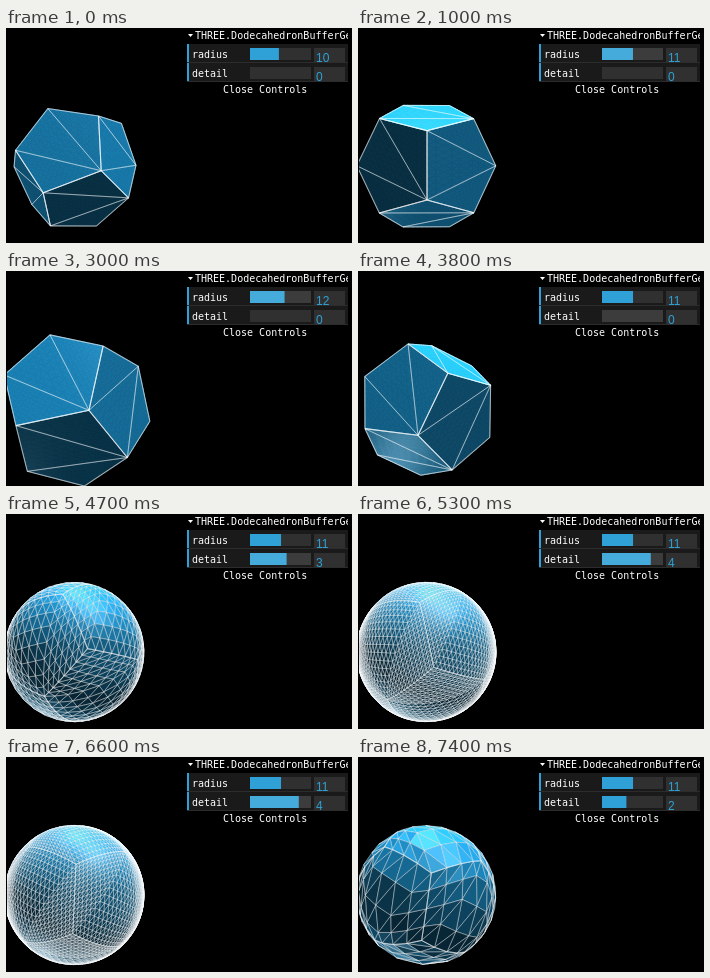
Write an HTML page with a canvas that moves like this. It is 346x215 px and loops after 7.5 s.

```html
<!DOCTYPE html>
<html lang="en">
<head>
<meta charset="utf-8">
<title>Dodecahedron geometry</title>
<style>
html, body { margin: 0; width: 100%; height: 100%; overflow: hidden; background: #000; }
canvas { display: block; }
</style>
</head>
<body>
<canvas width="346" height="215"></canvas>
<script>
const ctx = document.querySelector('canvas').getContext('2d');
const LOOP = 7500, STEP = 100;
const FOCAL = 183, CX = 68.3, CY = 138, CAMERA = [0, 0, 30];
const LIGHTS = [[0, 200, 0], [100, 200, 100], [-100, -200, -100]];
const COLOR = [21, 98, 137], EMISSIVE = [7, 37, 52], SPECULAR = 0x11 / 255;

// [time, value] keys
const RADIUS = [[300, 10], [800, 10.65], [1300, 10.65], [1700, 11.8], [2200, 12.5],
  [2600, 12.5], [3200, 11.4], [3500, 10.67]];
const ANGLE = [[0, 161.2], [3800, 230.9], [4700, 248.5], [5900, 268], [7400, 278]];
const DETAIL = [[0, 0], [4200, 1], [4400, 2], [4600, 3], [5000, 4], [5400, 5],
  [6400, 4], [6800, 3], [7100, 2]];

const T = (1 + Math.sqrt(5)) / 2, R = 1 / T;
const VERTICES = [
  [-1, -1, -1], [-1, -1, 1], [-1, 1, -1], [-1, 1, 1], [1, -1, -1], [1, -1, 1], [1, 1, -1], [1, 1, 1],
  [0, -R, -T], [0, -R, T], [0, R, -T], [0, R, T], [-R, -T, 0], [-R, T, 0], [R, -T, 0], [R, T, 0],
  [-T, 0, -R], [T, 0, -R], [-T, 0, R], [T, 0, R]];
const FACES = ['3 11 7 15 13', '7 19 17 6 15', '17 4 8 10 6', '8 0 16 2 10', '0 12 1 18 16',
  '6 10 2 13 15', '2 16 18 3 13', '18 1 9 11 3', '4 14 12 0 8', '11 9 5 19 7',
  '19 5 14 4 17', '1 12 14 5 9'].map(s => s.split(' ').map(Number));

const sub = (a, b) => [a[0] - b[0], a[1] - b[1], a[2] - b[2]];
const add = (a, b) => [a[0] + b[0], a[1] + b[1], a[2] + b[2]];
const dot = (a, b) => a[0] * b[0] + a[1] * b[1] + a[2] * b[2];
const scale = (a, k) => [a[0] * k, a[1] * k, a[2] * k];
const unit = a => scale(a, 1 / Math.hypot(a[0], a[1], a[2]));
const mix = (a, b, k) => add(a, scale(sub(b, a), k));
const cross = (a, b) => [a[1] * b[2] - a[2] * b[1], a[2] * b[0] - a[0] * b[2], a[0] * b[1] - a[1] * b[0]];
const facing = (normal, p) => dot(normal, sub(CAMERA, p)) > 0;

function tween(keys, t) {
  const i = keys.findIndex(k => k[0] > t);
  if (i === 0) return keys[0][1];
  if (i < 0) return keys[keys.length - 1][1];
  const [t0, a] = keys[i - 1], [t1, b] = keys[i];
  return a + (b - a) * (t - t0) / (t1 - t0);
}
const held = (keys, t) => keys.filter(k => k[0] <= t).pop()[1];

function rotate([x, y, z], angle) {
  const s = Math.sin(angle), c = Math.cos(angle), depth = z * c - x * s;
  return [x * c + z * s, y * c - depth * s, y * s + depth * c];
}

// Flat Phong shading
function shade(p, n) {
  const view = unit(sub(CAMERA, p));
  let diffuse = 0, gloss = 0;
  for (const light of LIGHTS) {
    const l = unit(sub(light, p)), nl = dot(n, l);
    if (nl <= 0) continue;
    const h = unit(add(l, view)), lh = Math.max(0, dot(l, h));
    const fresnel = SPECULAR + (1 - SPECULAR) * 2 ** ((-5.55473 * lh - 6.98316) * lh);
    diffuse += nl;
    gloss += nl * fresnel * 4 * Math.max(0, dot(n, h)) ** 30;
  }
  const rgb = COLOR.map((c, i) => Math.min(255, Math.round(c * diffuse + EMISSIVE[i] + 255 * gloss)));
  return `rgb(${rgb})`;
}

function trace(points, close) {
  ctx.beginPath();
  for (const [x, y, z] of points) {
    const k = FOCAL / (CAMERA[2] - z);
    ctx.lineTo(CX + x * k, CY - y * k);
  }
  if (close) ctx.closePath();
}

function line(points, width, alpha, close) {
  trace(points, close);
  ctx.lineWidth = width;
  ctx.strokeStyle = `rgba(255,255,255,${alpha})`;
  ctx.stroke();
}

// Splits a triangle into n * n cells
function split(a, b, c, n, place, visit) {
  const rows = [];
  for (let i = 0; i <= n; i++) {
    const from = mix(a, c, i / n), to = mix(b, c, i / n), row = [];
    for (let j = 0; j <= n - i; j++) row.push(place(i === n ? from : mix(from, to, j / (n - i))));
    rows.push(row);
  }
  for (let i = 0; i < n; i++) {
    for (let j = 0; j < n - i; j++) {
      visit(rows[i][j], rows[i][j + 1], rows[i + 1][j]);
      if (j < n - i - 1) visit(rows[i][j + 1], rows[i + 1][j + 1], rows[i + 1][j]);
    }
  }
}

function drawSolid(radius, detail, angle) {
  const points = VERTICES.map(v => rotate(scale(unit(v), radius), angle));
  const place = detail ? p => scale(unit(p), radius) : p => p;
  const cols = 2 ** detail;

  const cell = (a, b, c) => {
    const n = unit(cross(sub(b, a), sub(c, a)));
    if (!facing(n, a)) return;
    const color = shade(scale(add(add(a, b), c), 1 / 3), n);
    trace([a, b, c], true);
    ctx.fillStyle = color;
    ctx.fill();
    if (detail) return line([a, b, c], 0.8, 0.5, true);
    ctx.strokeStyle = color;
    ctx.lineWidth = 0.7;
    ctx.stroke();
  };

  ctx.lineJoin = 'round';
  for (const face of FACES) {
    const p = face.map(i => points[i]);
    for (let k = 1; k < 4; k++) split(p[0], p[k], p[k + 1], detail ? cols : 10, place, cell);
  }
  for (const face of FACES) {
    const p = face.map(i => points[i]), normal = p.reduce(add);
    if (!detail && facing(normal, p[0])) {
      for (let k = 1; k < 4; k++) line([p[0], p[k], p[k + 1]], 0.8, 0.45, true);
    }
    p.forEach((a, k) => {
      const b = p[(k + 1) % 5];
      for (let i = 0; i < cols; i++) {
        const u = place(mix(a, b, i / cols)), v = place(mix(a, b, (i + 1) / cols));
        if (facing(detail ? u : normal, u)) line([u, v], 1.1, detail ? 0.25 : 0.4);
      }
    });
  }
}

function box(color, x, y, w, h) {
  ctx.fillStyle = color;
  ctx.fillRect(x, y, w, h);
}

function text(str, x, y, color = '#fff', font = '10px "DejaVu Sans Mono", monospace') {
  ctx.font = font;
  ctx.fillStyle = color;
  ctx.fillText(str, x, y);
}

function drawRow(y, label, value, part, hover) {
  box('#1a1a1a', 181, y, 161, 18);
  box('#2c2c2c', 181, y + 18, 161, 1);
  box('#2fa1d6', 181, y, 2, 18);
  text(label, 186, y + 14);
  box(hover ? '#3c3c3c' : '#303030', 244, y + 4, 61, 12);
  box(hover ? '#44abda' : '#2fa1d6', 244, y + 4, 61 * part, 12);
  box('#303030', 308, y + 4, 31, 14);
  text(value, 310, y + 18, '#2fa1d6', '12px "Liberation Sans", Arial, sans-serif');
}

function drawPanel(t, radius, detail) {
  box('#000', 181, 0, 161, 71);
  ctx.save();
  ctx.beginPath();
  ctx.rect(181, 0, 161, 71);
  ctx.clip();
  ctx.fillStyle = '#fff';
  ctx.beginPath();
  ctx.moveTo(182, 6);
  ctx.lineTo(187, 6);
  ctx.lineTo(184.5, 9);
  ctx.fill();
  text('THREE.DodecahedronBufferGeometry', 189, 11);
  drawRow(16, 'radius', Math.round(radius), (radius - 1) / 19, t >= 400 && t < 3600);
  drawRow(35, 'detail', detail, detail / 5, t >= 3700 && t < 7200);
  text('Close Controls', 217, 65);
  ctx.restore();
}

let shown = -1;
function frame() {
  const t = Math.floor(performance.now() % LOOP / STEP) * STEP;
  if (t !== shown) {
    shown = t;
    const radius = tween(RADIUS, t), detail = held(DETAIL, t);
    box('#000', 0, 0, 346, 215);
    drawSolid(radius, detail, tween(ANGLE, t) * Math.PI / 180);
    box('#000', 0, 0, 1, 215);
    drawPanel(t, radius, detail);
  }
  requestAnimationFrame(frame);
}
frame();
</script>
</body>
</html>
```
